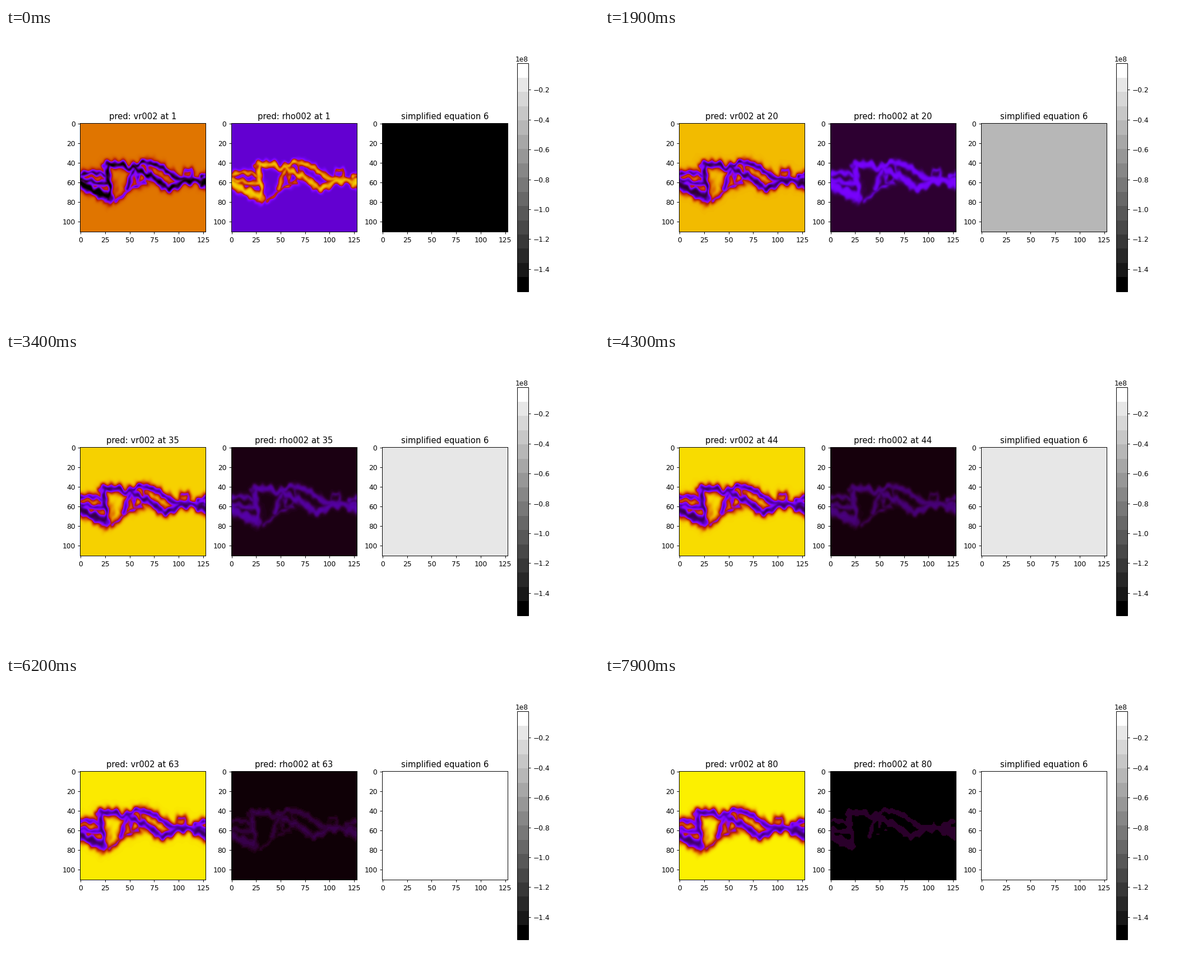
A matplotlib script that plays this animation: 1058x529 px, repeating every 8 s.

```python
import numpy as np
import matplotlib.pyplot as plt
from matplotlib.animation import FuncAnimation
from matplotlib.cm import ScalarMappable
from matplotlib.colors import ListedColormap, Normalize

W, H = 1058, 529
NX, NY, FRAMES = 128, 111, 80
VMIN, VMAX = -1.55e8, -0.024e8

rng = np.random.default_rng(4)
Y, X = np.mgrid[0:NY, 0:NX].astype(float)
U = np.linspace(0, 1, 90)


def smooth(a, b, x):
    u = np.clip((x - a) / (b - a), 0, 1)
    return u * u * (3 - 2 * u)


def bump(x, mid, width):
    return np.exp(-((x - mid) / width) ** 2)


def bow(x0, y0, x1, y1, rise=0):
    """A line from one point to another, bent down by rise."""
    return x0 + (x1 - x0) * U, y0 + (y1 - y0) * U + rise * np.sin(np.pi * U)


def ring(cx, cy, rx, ry):
    a = 2 * np.pi * U
    return cx + rx * np.cos(a), cy + ry * np.sin(a)


def lower_arm():
    x = 27 + 101 * U
    return x, 42 + 16 * smooth(37, 90, x) + 7.5 * bump(x, 91, 11)


def upper_arm():
    x = 56 + 56 * U
    return x, 40 + 17 * smooth(70, 105, x) + 3 * bump(x, 56, 5)


def trunk():
    y = 42 + 36 * U
    return 29 - 1.5 * np.sin(2 * np.pi * U), y


# Half-width and centre line of each filament, in grid units.
STRANDS = [
    (3.8, lower_arm()),
    (3.1, upper_arm()),
    (4.2, trunk()),
    (5.0, bow(-4, 60, 28, 75)),
    (2.9, bow(-4, 57, 28, 62)),
    (2.6, bow(-4, 54, 29, 54, -4)),
    (2.4, bow(56, 44, 48, 66)),
    (1.3, bow(37, 78, 67, 61, -3)),
    (1.4, bow(68, 40, 70, 54)),
    (1.2, ring(62, 56, 5, 5)),
    (1.2, ring(110, 53, 4, 6)),
]


def noise(k_min, k_max, ky, count=12):
    """Smooth noise, periodic in x, with a unit spread."""
    total = np.zeros_like(X)
    for _ in range(count):
        a = 2 * np.pi * rng.integers(k_min, k_max) / NX
        b = 2 * np.pi * rng.uniform(-ky, ky) / NY
        total += np.cos(a * X + b * Y + rng.uniform(0, 2 * np.pi))
    return total / np.sqrt(count / 2)


def filaments():
    x = X + 0.8 * noise(4, 14, 8)
    y = Y + 0.9 * noise(4, 16, 6)
    d = np.full_like(X, 99.0)
    for half, (px, py) in STRANDS:
        for cx, cy in zip(px, py):
            dx = (x - cx + NX / 2) % NX - NX / 2
            d = np.minimum(d, np.hypot(dx, y - cy) - half)
    d += 0.4 * noise(6, 20, 12)
    return 1 / (1 + np.exp(np.where(d > 0, d * 0.8, d)))


SPECTRUM = np.fft.fft2(filaments())
KX = 2 * np.pi * np.fft.fftfreq(NX)[None, :]
KY = 2 * np.pi * np.fft.fftfreq(NY)[:, None]


def drifted(shift, blur):
    """The filaments moved to the left and softened."""
    kernel = np.exp(1j * KX * shift - (KX**2 + KY**2) * blur**2 / 2)
    return np.clip(np.fft.ifft2(SPECTRUM * kernel).real, 0, 1)


def fields(t):
    radius = 1 + 0.05 * (t - 1)
    q = radius ** -2
    f = drifted(0.11 * (t - 1), 0.4 + 0.006 * t)

    far = 1 - 0.261 * (1 / radius - 0.126)
    core = 0.09 * (1 - 1 / radius) - 0.02
    vr = far - (far - core) * f

    dense = f ** 1.7
    if t > 50:
        steps = max(1, round(8 * (FRAMES - t) / 35))
        dense = np.round(dense * steps) / steps
    rho = 0.156 * q ** 1.1 - 0.003 + 0.79 * dense * q ** 1.03
    return vr, rho, VMIN * q


def rect(x, top, w, h):
    return [x / W, 1 - (top + h) / H, w / W, h / H]


shades = (np.arange(16) + 0.5) / 16
shades[[0, -1]] = 0, 1
grays = ListedColormap(np.repeat(shades[:, None], 3, axis=1))
gray_norm = Normalize(VMIN, VMAX)

# 12 x 6 inches at this dpi gives the 1058 x 529 stage.
fig = plt.figure(figsize=(12, 6), dpi=88.167, facecolor="white")


def panel(i, **style):
    ax = fig.add_axes(rect(132.4 + 269.3 * i, 170.3, 223.9, 193.9))
    im = ax.imshow(np.zeros((NY, NX)), aspect="auto", **style)
    ax.set_xticks(range(0, 126, 25))
    ax.set_yticks(range(0, 101, 20))
    return ax, im


ax_vr, im_vr = panel(0, cmap="gnuplot", vmin=0, vmax=1)
ax_rho, im_rho = panel(1, cmap="gnuplot", vmin=0, vmax=1)
ax_eq, im_eq = panel(2, cmap=grays, norm=gray_norm)
ax_eq.set_title("simplified equation 6")

cax = fig.add_axes(rect(911.6, 63.5, 20.4, 407.3))
fig.colorbar(ScalarMappable(gray_norm, grays), cax=cax)


def update(i):
    t = i + 1
    vr, rho, eq = fields(t)
    im_vr.set_data(vr)
    im_rho.set_data(rho)
    im_eq.set_data(np.full((NY, NX), eq))
    ax_vr.set_title(f"pred: vr002 at {t}")
    ax_rho.set_title(f"pred: rho002 at {t}")
    return im_vr, im_rho, im_eq


anim = FuncAnimation(fig, update, frames=FRAMES, interval=100,
                     init_func=lambda: update(0), repeat=True, blit=False)
plt.show()
```
